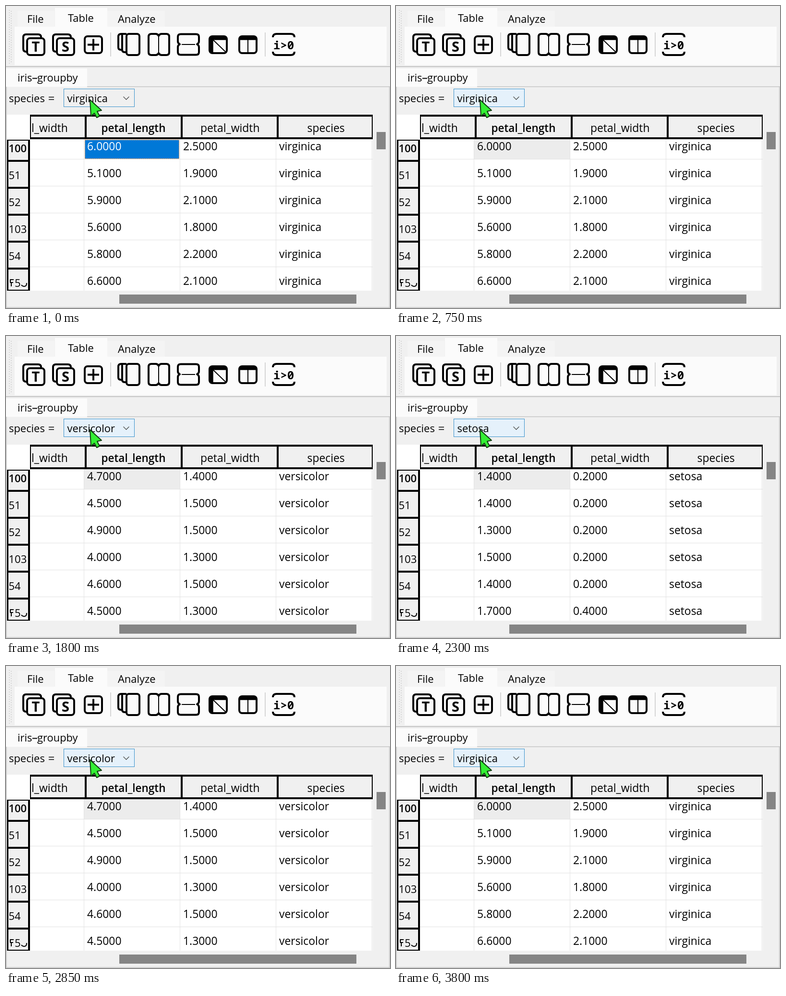
An HTML page for the animation above (3850 ms loop, 800 px wide and 628 px high).

```html
<!DOCTYPE html>
<html lang="en">
<head>
<meta charset="utf-8">
<title>Group table</title>
<style>
  html, body { margin: 0; width: 100%; height: 100%; overflow: hidden; background: #f0f0f0; }
  svg { display: block; width: 800px; height: 628px; font-family: "Open Sans", "Noto Sans", sans-serif; }
  text { white-space: pre; fill: #000; }
  .ui { font-size: 21.9px; }
  .cell { font-size: 22.9px; }
  .head { font-size: 22px; }
  .bold { font-weight: 600; }
  .title { font-size: 22.5px; font-weight: 600; }
  .icon { fill: none; stroke: #000; stroke-width: 4; stroke-linejoin: round; }
  .thin { stroke-width: 2; }
  .wide { stroke-width: 7.5; }
  .mono { font: bold 24px "Noto Sans Mono", "DejaVu Sans Mono", monospace; }
</style>
</head>
<body>
<svg id="stage" viewBox="0 0 800 628"></svg>
<script>
const NS = "http://www.w3.org/2000/svg";
const stage = document.getElementById("stage");
const LOOP = 3850;
const BG = "#f0f0f0", PALE = "#fbfbfb", WHITE = "#fff", GRID = "#e2e2e2";
const LINE = "#c6c6c6", BLACK = "#000", THUMB = "#858585";

function add(tag, attrs, content) {
  const el = document.createElementNS(NS, tag);
  for (const key in attrs) el.setAttribute(key, attrs[key]);
  if (content !== undefined) el.textContent = content;
  return stage.appendChild(el);
}
const rect = (x, y, width, height, fill, more) => add("rect", { x, y, width, height, fill, ...more });
const text = (x, y, content, cls) => add("text", { x, y, class: cls }, content);
const path = (d, cls = "icon", more) => add("path", { d, class: cls, ...more });
const line = (d, stroke, width, more) => add("path", { d, fill: "none", stroke, "stroke-width": width, ...more });
const box = (x, y, width, height, rx = 6) => add("rect", { x, y, width, height, rx, class: "icon" });

// Ribbon
rect(18, 43, 775, 80, PALE);
rect(24, 10, 77, 33, "#f4f4f4");
rect(211, 10, 120, 33, "#f4f4f4");
rect(102, 4, 109, 40, PALE);
line("M7 8V120M11 10V120", "#d6d6d6", 2, { "stroke-dasharray": "2 3" });
text(44, 35, "File", "ui");
text(129, 33, "Table", "ui");
text(233, 35, "Analyze", "ui");
line("M218 55V105M540 55V105", "#d6d6d6", 2);

// Icons
for (const [x, letter] of [[0, "T"], [62, "S"]]) {
  path(`M${x + 43} 95H${x + 42}Q${x + 36} 95 ${x + 36} 89V65Q${x + 36} 59 ${x + 42} 59H${x + 67}Q${x + 73} 59 ${x + 73} 65`);
  box(x + 44, 67, 36, 35);
  add("text", { x: x + 62, y: 95, "font-size": 29, "font-weight": 700, "text-anchor": "middle" }, letter);
}
box(164, 63, 36, 35);
path("M170 80.5H194M182 68.5V92.5");
path("M251 58H240Q234 58 234 64V86Q234 91 239 91H242M242 58V91Q242 96 247 96H251");
box(251, 58, 27, 44, 5);
const split = "M318 62Q316 58 312 58H303Q297 58 297 64V96Q297 102 303 102H312Q316 102 318 98Q320 102 324 102H334Q340 102 340 96V64Q340 58 334 58H324Q320 58 318 62Z";
path(split);
path("M318 63V97M366 80H394", "icon thin");
path(split, "icon", { transform: "translate(380 80) rotate(90) translate(-318.5 -80)" });
box(424, 63, 36, 35);
path("M424 67H460M428 63V98", "icon wide");
path("M429 68L458 96", "icon thin");
box(486, 63, 36, 35);
path("M486 67H522", "icon wide");
path("M504 70V98", "icon thin");
path("M556 65Q556 58 564 58H593Q601 58 601 65M556 95Q556 102 564 102H593Q601 102 601 95");
text(557, 90, "i>0", "mono");

// Document tab and filter
rect(0, 125, 800, 2, LINE);
rect(169, 167, 631, 1.5, LINE);
rect(0, 130, 169, 38, PALE);
rect(0, 168, 1.5, 460, LINE);
rect(798, 168, 1.5, 460, LINE);
rect(0, 626, 800, 1.5, LINE);
text(24, 157, "iris", "ui");
rect(55, 149.5, 10, 2, BLACK);
text(65, 157, "groupby", "ui");
text(6, 200, "species", "ui");
line("M89 189.5H100M89 194.5H100", BLACK, 1.5);
const combo = rect(120.5, 172.5, 147, 37, BG, { stroke: "#3a93cc" });
const choice = text(127.5, 200, "", "ui");
line("M244.5 188.5L250.5 194.5L256.5 188.5", "#505050", 1.3);

// Table body
rect(2, 226, 48, 52, WHITE);
rect(50, 277, 714, 315, WHITE);
const current = rect(163, 277, 199, 41, "#ececec");
const focus = rect(164.5, 278.5, 196, 39, "#0078d7", { stroke: "#ff8728", "stroke-dasharray": "2 2" });
for (let i = 0; i < 5; i++) rect(50, 318 + 56 * i, 714, 1, GRID);
for (let i = 0; i < 4; i++) rect(162 + 200 * i, 277, 1, 315, GRID);

// Column headers
rect(50, 226, 714, 51, BLACK);
[[52, 112], [168, 196], [368, 196], [568, 194]].forEach(([x, w]) => rect(x, 230, w, 43, BG));
text(53, 262, "l_width", "cell");
text(198.5, 262, "petal_length", "title");
text(405, 262, "petal_width", "cell");
text(627.5, 262, "species", "cell");

// Row headers
rect(2, 278, 48, 314, BLACK);
["100", "51", "52", "103", "54", ""].forEach((label, i) => {
  const top = i ? 268 + 56 * i : 280;
  rect(5, top, 41, (i < 5 ? 320 + 56 * i : 590) - top, BG);
  text(5.5, 304 + 56 * i, label, i ? "head" : "head bold");
});
text(18, 584, "5", "head");
path("M16 569H9V575H15M11 575V583M32 580Q34 583 38 583Q43 583 43 576", "icon thin");

// Scroll bars
rect(772, 262, 19, 36, THUMB);
rect(236, 600, 494, 19, THUMB);

const groups = {
  virginica: [[6, 2.5], [5.1, 1.9], [5.9, 2.1], [5.6, 1.8], [5.8, 2.2], [6.6, 2.1]],
  versicolor: [[4.7, 1.4], [4.5, 1.5], [4.9, 1.5], [4, 1.3], [4.6, 1.5], [4.5, 1.3]],
  setosa: [[1.4, .2], [1.4, .2], [1.3, .2], [1.5, .2], [1.4, .2], [1.7, .4]]
};
const rows = groups.setosa.map((_, i) => [169, 369, 569].map(x => text(x, 300 + 56 * i, "", "cell")));

// Pointer
add("path", {
  d: "M175 195L177 229L184 223L189 232L195 229L190 219L199 217Z",
  fill: "#35ee35", stroke: "#103c10", "stroke-width": 2, "stroke-linejoin": "round"
});

// Start time, group, whether the table has the focus
const steps = [
  [0, "virginica", true],
  [750, "virginica", false],
  [1300, "versicolor", false],
  [2300, "setosa", false],
  [2650, "versicolor", false],
  [3250, "virginica", false]
];
let shown;

function show(step) {
  if (step === shown) return;
  shown = step;
  const [, name, focused] = step;
  choice.textContent = name;
  combo.setAttribute("fill", focused ? BG : "#e5f1fb");
  focus.style.display = focused ? "" : "none";
  current.style.display = focused ? "none" : "";
  rows.forEach((cells, i) => {
    const [length, width] = groups[name][i];
    [length.toFixed(4), width.toFixed(4), name].forEach((value, j) => { cells[j].textContent = value; });
  });
  rows[0][0].style.fill = focused ? WHITE : "";
}

function tick() {
  const t = performance.now() % LOOP;
  show(steps.findLast(([start]) => start <= t));
  requestAnimationFrame(tick);
}
tick();
</script>
</body>
</html>
```
